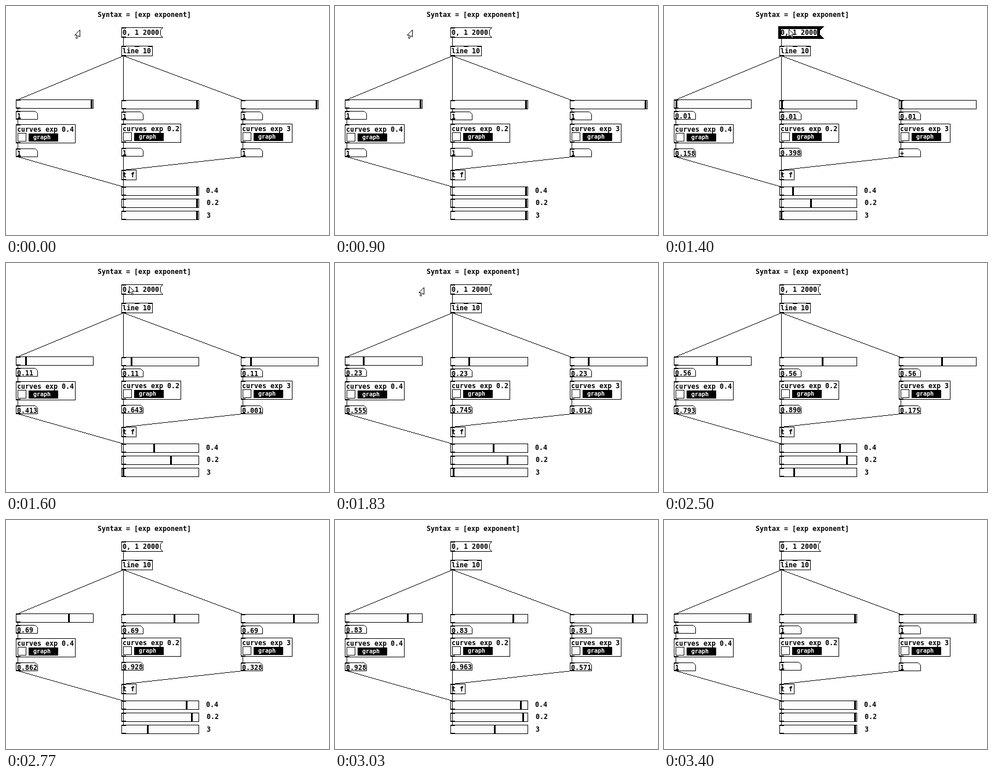
Write an HTML page with a canvas that moves like this. It is 557 px wide and 397 px high and loops after 4560 ms.

```html
<!DOCTYPE html>
<html lang="en">
<head>
<meta charset="utf-8">
<title>Exponent curves</title>
<style>
html, body { margin: 0; width: 100%; height: 100%; overflow: hidden; background: #fff; }
canvas { display: block; }
</style>
</head>
<body>
<canvas id="stage" width="557" height="397"></canvas>
<script>
const ctx = document.getElementById('stage').getContext('2d');
const LOOP = 4560;
const START = 900;
const STEP = 100 / 3;
const CLICK = 14.1;       // in steps after START
const RAMP = 60;          // steps for the ramp from 0 to 1
const PANEL = '#fcfcfc';
const FAMILY = '"DejaVu Sans Mono", monospace';

function bar(x, y, w, h, color = '#000') {
  ctx.fillStyle = color;
  ctx.fillRect(x, y, w, h);
}

function text(str, x, y, size = 11.63, color = '#000') {
  ctx.font = `bold ${size}px ${FAMILY}`;
  ctx.fillStyle = color;
  ctx.fillText(str, x, y);
}

function box(x, y, w, h, fill = '#fff') {
  bar(x, y, w + 1, h + 1);
  bar(x + 1, y + 1, w - 1, h - 1, fill);
}

function poly(points, width = 1) {
  ctx.beginPath();
  for (const [x, y] of points) ctx.lineTo(x + 0.5, y + 0.5);
  ctx.closePath();
  ctx.fillStyle = '#fff';
  ctx.strokeStyle = '#000';
  ctx.lineWidth = width;
  ctx.fill();
  ctx.stroke();
}

// Hard-edged line, one pixel wide
function cord(x0, y0, x1, y1) {
  const n = Math.max(Math.abs(x1 - x0), Math.abs(y1 - y0));
  for (let i = 0; i <= n; i++) {
    bar(Math.round(x0 + (x1 - x0) * i / n), Math.round(y0 + (y1 - y0) * i / n), 1, 1);
  }
}

function ports(x, y, h) {
  bar(x, y, 8, 2);
  bar(x, y + h - 1, 8, 2);
}

function slider(x, y, value) {
  box(x, y, 133, 15, PANEL);
  ports(x, y, 15);
  bar(x + 2 + Math.round(value * 127), y + 1, 3, 14);
}

function format(value) {
  if (value > 0 && value < 1e-4) return '+';
  return String(+value.toPrecision(6)).slice(0, 5);
}

function number(x, y, value) {
  poly([[x, y], [x + 33, y], [x + 37, y + 4], [x + 37, y + 14], [x, y + 14]]);
  ports(x, y, 14);
  text(format(value), x + 2, y + 13);
}

function object(x, y, str) {
  box(x, y, str.length * 7 + 4, 17);
  ports(x, y, 17);
  text(str, x + 2, y + 13);
}

function curve(x, y, exponent) {
  const str = 'curves exp ' + exponent;
  box(x, y, str.length * 7 + 4, 32);
  ports(x, y, 32);
  text(str, x + 2, y + 13);
  box(x + 3, y + 15, 14, 14, PANEL);
  bar(x + 22, y + 16, 51, 14);
  text('graph', x + 30, y + 26, 10, '#fff');
}

function message(flash) {
  poly([[199, 37], [270, 37], [266, 41], [266, 50], [270, 54], [199, 54]], flash ? 5 : 1);
  ports(199, 37, 17);
  text('0, 1 2000', 201, 50);
}

function channel(x, tops, exponent, value) {
  const [slide, input, graph, output] = tops;
  slider(x, slide, value);
  number(x, input, value);
  curve(x, graph, exponent);
  number(x, output, value ** exponent);
  cord(x + 3, slide + 15, x + 3, input);
  cord(x + 3, input + 14, x + 3, graph);
  cord(x + 3, graph + 32, x + 3, output);
}

function pointer(k) {
  let x = 127, y = 41;
  if (k >= 19) {
    const d = k - 19;
    x = 215 - 0.765 * d * d;
    y = 40 + Math.min(d / 4.5, 4);
  } else if (k >= 0) {
    const p = Math.sin(Math.min(k / 12, 1) * Math.PI / 2);
    x = 133 + 82 * p;
    y = 41 - p;
  }
  if (x < 0) return;
  x = Math.round(x);
  y = Math.round(y);
  const side = x >= 199 ? 1 : -1;
  const shape = [[0, 0], [0, 12], [3, 10], [5, 15], [7, 14], [5, 9], [9, 9]];
  poly(shape.map(([dx, dy]) => [x + side * dx, y + dy]));
}

function draw(time) {
  const k = Math.floor((time - START + 4) / STEP);
  const clicked = k >= CLICK;
  const value = clicked ? Math.min(1, Math.floor((k - CLICK) * 100 / RAMP) / 100) : 1;

  bar(0, 0, 557, 397, '#fff');
  text('Syntax = [exp exponent]', 158, 19);
  message(clicked && k < 18);
  object(199, 69, 'line 10');
  bar(222, 69, 8, 2);
  bar(245, 69, 8, 2);

  channel(17, [162, 182, 205, 247], 0.4, value);
  channel(199, [163, 183, 204, 246], 0.2, value);
  channel(405, [163, 183, 204, 247], 3, value);

  object(199, 284, 't f');
  [[0.4, 313, 345], [0.2, 334, 346], [3, 355, 346]].forEach(([exponent, y, labelX], i) => {
    slider(199, y, value ** exponent);
    text(String(exponent), labelX, y + 11 + (i === 2 ? 1 : 0));
  });

  cord(202, 54, 202, 69);
  cord(202, 86, 20, 162);
  cord(202, 86, 202, 163);
  cord(202, 86, 408, 163);
  cord(20, 261, 202, 313);
  cord(408, 261, 202, 284);
  cord(202, 260, 202, 355);

  if (k < 75) pointer(k);
}

function tick() {
  draw(performance.now() % LOOP);
  requestAnimationFrame(tick);
}
tick();
</script>
</body>
</html>
```
